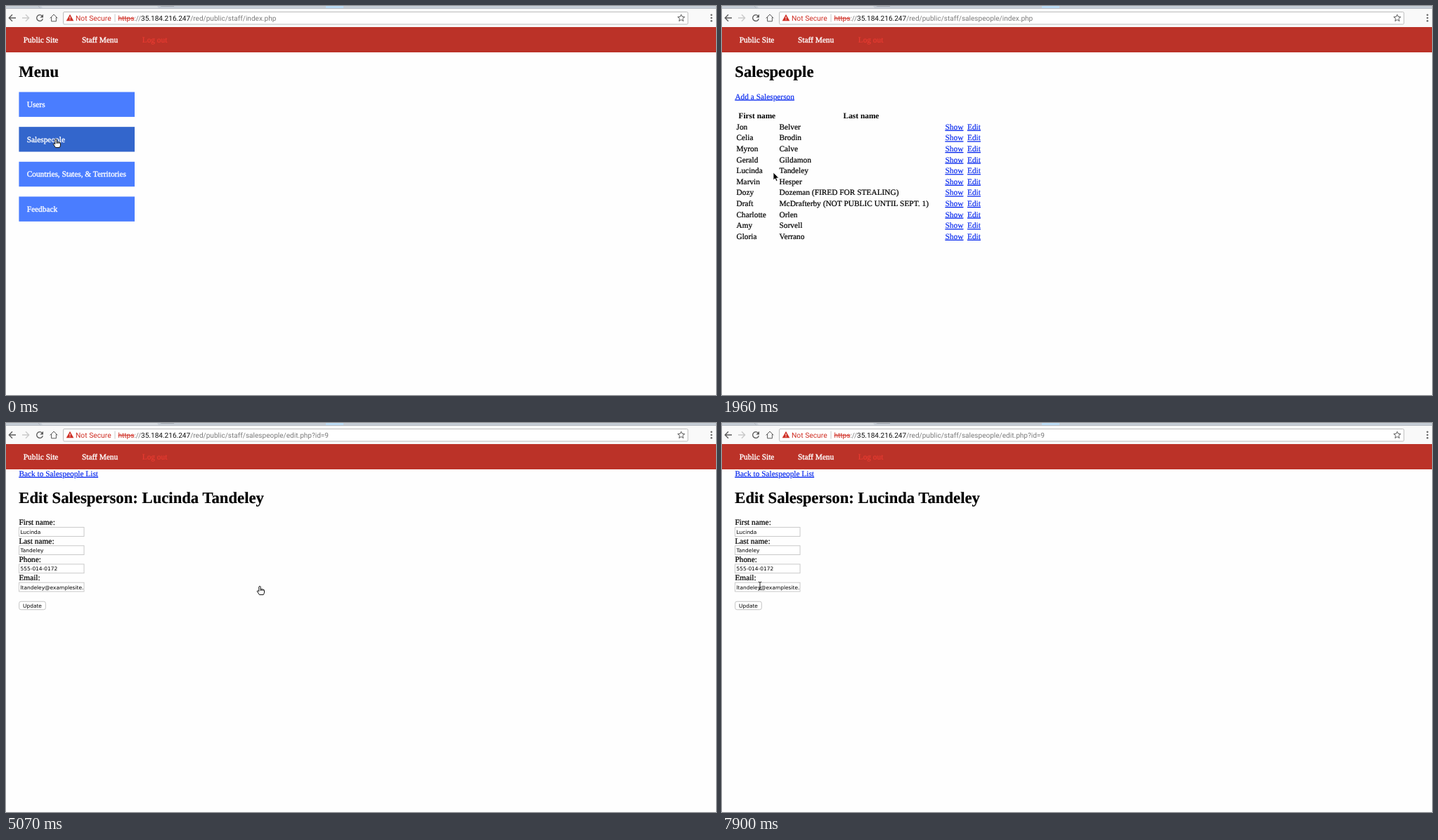
These frames come from a looping animation (1010x554 px, 8 s). An HTML page:

```html
<!DOCTYPE html>
<html lang="en">
<head>
<meta charset="utf-8">
<title>Staff area</title>
<style>
  html, body { margin: 0; height: 100%; overflow: hidden; background: #fefefe; }
  svg { display: block; width: 100vw; height: 100vh; }
  text {
    font: 11.36px "Liberation Serif", serif; text-rendering: geometricPrecision;
    color: #000; fill: currentColor; stroke: currentColor; stroke-width: .22;
  }
  .h1 { font-size: 22.7px; font-weight: bold; }
  .th { font-weight: bold; text-anchor: middle; stroke: none; }
  .light { color: #fff; stroke-width: .35; }
  .logout { color: #e83c32; }
  .link { color: #0426ee; text-decoration: underline; stroke-width: .15; }
  .bar { font: 10.05px Roboto, sans-serif; color: #7b7b7b; stroke: none; }
  .warn { color: #cf2f25; }
  .bar tspan { fill: currentColor; }
  .host { color: #111; }
  .field { font: 7.45px "DejaVu Sans", sans-serif; stroke: none; }
  .icon { fill: none; stroke: #5a5a5a; stroke-width: 1.3; }
  .thin { stroke-width: 1; }
</style>
</head>
<body>
<svg viewBox="0 0 1010 554">
  <defs>
    <path id="arrow" d="M0 0V11L2.5 8.7 4.2 12.5 6 11.7 4.4 8H7.8Z" stroke="#fff" stroke-width=".8"/>
    <path id="hand" d="M-1.2 1.2Q0-.6 1.2 1.2V5Q2 4 3 5Q4.2 4.2 5 5.4Q6.3 5 6.5 6.6V9Q6.3 11 5.2 12.6H-.6Q-2 10-3.9 7.6Q-3.4 5.8-1.2 7.8Z M1.2 5V7M3 5.2V7M5 5.6V7.2" fill="#fff" stroke="#111" stroke-width="1"/>
    <path id="beam" d="M-2.2-5.7Q0-5.7 0-4.4Q0-5.7 2.2-5.7M0-4.5V4.5M-2.2 5.7Q0 5.7 0 4.4Q0 5.7 2.2 5.7M-1.2 2H1.2" fill="none" stroke="#222"/>
  </defs>

  <!-- browser toolbar -->
  <rect width="1010" height="30" fill="#f9f9f9"/>
  <path d="M0 0H1010V3.5H0Z" fill="#c6cdd6"/>
  <path d="M50 0H215L217 3H52Z" fill="#d7dce2"/>
  <path d="M455 0H480V3.5H455Z" fill="#bddcf5"/>
  <path d="M219 0H239V1H221Z" fill="#a3a9b0"/>
  <path d="M0 3.5H1010M46 0L49 3.5" fill="none" stroke="#acb2b9" stroke-width=".8"/>
  <path class="icon" d="M14 17H4.5M9 12.3L4.3 17 9 21.7"/>
  <path class="icon" d="M23 17H32.5M28 12.3L32.7 17 28 21.7" style="stroke:#c9c9c9"/>
  <g id="reload">
    <path class="icon" d="M51.3 14A4.4 4.4 0 1 0 52.3 18.3"/>
    <path d="M53 11.8V16.4H48.4Z" fill="#5a5a5a"/>
  </g>
  <path id="stop" class="icon" d="M44 13L52 21M52 13L44 21"/>
  <path class="icon thin" d="M62.7 17.4L68 12 73.3 17.4M64.6 16V21.8H71.4V16"/>
  <rect x="81.5" y="8.5" width="888.5" height="17.5" rx="1.5" fill="#fff" stroke="#bcbcbc"/>
  <path d="M91 11.8L96.3 21.3H85.7Z" fill="#cf2f25"/>
  <path d="M91 15V18M91 18.8V20" stroke="#fff"/>
  <text class="bar warn" x="99" y="20.5" style="font-size:10.3px">Not Secure</text>
  <path d="M155 11.5V22.5" stroke="#c8c8c8"/>
  <text class="bar" x="159.5" y="20.5"><tspan class="warn" text-decoration="line-through">https</tspan>://<tspan class="host">35.184.216.247</tspan><tspan id="path"></tspan></text>
  <path class="icon thin" d="M960.5 12L961.9 15.3 965.4 15.6 962.7 18 963.5 21.5 960.5 19.6 957.5 21.5 958.3 18 955.6 15.6 959.1 15.3Z"/>
  <g fill="#5a5a5a"><circle cx="1003.5" cy="12.8" r="1.2"/><circle cx="1003.5" cy="17" r="1.2"/><circle cx="1003.5" cy="21.2" r="1.2"/></g>

  <!-- site navigation -->
  <rect y="30" width="1010" height="36" fill="#bb3228"/>
  <text class="light" x="24.8" y="52.4">Public Site</text>
  <text class="light" x="108" y="52.4">Staff Menu</text>
  <text class="logout" x="193.7" y="52.4">Log out</text>

  <g id="menu"></g>
  <g id="list"></g>
  <g id="edit"></g>
  <use id="cursor"/>
</svg>
<script>
const LOOP = 8000;
const el = id => document.getElementById(id);
const text = (x, y, content, style = '') =>
  `<text x="${x}" y="${y}" class="${style}">${content}</text>`;

const menuItems = ['Users', 'Salespeople', 'Countries, States, &amp; Territories', 'Feedback'];
el('menu').innerHTML = text(18.3, 101.4, 'Menu', 'h1') + menuItems.map((label, i) => {
  const y = 122.5 + i * 49.65;
  return `<rect x="18.4" y="${y}" width="164.6" height="35.4" fill="#4a7dff"/>`
    + text(29.7, y + 21.4, label, 'light');
}).join('');
const hovered = el('menu').querySelectorAll('rect')[1];

const people = [
  ['Jon', 'Belver'], ['Celia', 'Brodin'], ['Myron', 'Calve'], ['Gerald', 'Gildamon'],
  ['Lucinda', 'Tandeley'], ['Marvin', 'Hesper'], ['Dozy', 'Dozeman (FIRED FOR STEALING)'],
  ['Draft', 'McDrafterby (NOT PUBLIC UNTIL SEPT. 1)'], ['Charlotte', 'Orlen'],
  ['Amy', 'Sorvell'], ['Gloria', 'Verrano']
];
el('list').innerHTML = text(18.3, 101.4, 'Salespeople', 'h1')
  + text(18.4, 132.5, 'Add a Salesperson', 'link')
  + text(49.8, 160, 'First name', 'th') + text(198, 160, 'Last name', 'th')
  + people.map(([first, last], i) => {
    const y = 175.8 + i * 15.6;
    return text(20.5, y, first) + text(81.5, y, last)
      + text(317.5, y, 'Show', 'link') + text(349, y, 'Edit', 'link');
  }).join('');

const fields = [
  ['First name:', 'Lucinda'], ['Last name:', 'Tandeley'],
  ['Phone:', '555-014-0172'], ['Email:', 'ltandeley@examplesite.']
];
el('edit').innerHTML = text(18.4, 75.8, 'Back to Salespeople List', 'link')
  + text(18.3, 114.3, 'Edit Salesperson: Lucinda Tandeley', 'h1')
  + fields.map(([label, value], i) => {
    const y = 145.3 + i * 26.2;
    return text(18.4, y, label)
      + `<rect x="18.6" y="${y + 3.3}" width="92.4" height="12.8" fill="#fff" stroke="#c4c4c4" stroke-width=".9"/>`
      + text(20.5, y + 12.7, value, 'field');
  }).join('')
  + '<rect x="18.7" y="254.2" width="37.6" height="11.6" rx="2.5" fill="#fff" stroke="#bdbdbd" stroke-width=".9"/>'
  + text(24, 262.8, 'Update', 'field');

const screens = [
  { id: 'menu', start: 0, path: '/red/public/staff/index.php' },
  { id: 'list', start: 470, path: '/red/public/staff/salespeople/index.php' },
  { id: 'edit', start: 5070, path: '/red/public/staff/salespeople/edit.php?id=9' }
];

// Each move: first step time, last step time, evenly timed pointer poses.
const moves = [
  [0, 0, [[71, 189, 'hand']]],
  [1370, 1960, [[71, 194, 'arrow'], [71, 206, 'arrow'], [72, 221, 'arrow'], [73, 232, 'arrow'], [73, 237, 'arrow']]],
  [2560, 3580, [[76, 238, 'arrow'], [90, 235, 'beam'], [118, 236, 'beam'], [165, 240, 'arrow'],
    [218, 242, 'arrow'], [264, 241, 'arrow'], [301, 238, 'arrow'], [323, 236, 'hand']]],
  [3730, 4020, [[341, 234, 'hand'], [356, 232, 'hand'], [361, 232, 'hand']]],
  [5970, 7000, [[345, 225, 'arrow'], [304, 205, 'arrow'], [251, 187, 'arrow'], [200, 179, 'arrow'],
    [155, 195, 'arrow'], [125, 213, 'arrow'], [0, 254, 'arrow'], [6, 243, 'arrow']]],
  [7150, 7450, [[40, 231, 'beam'], [73, 237, 'beam'], [82, 241, 'arrow']]],
  [7750, 7900, [[65, 235, 'beam'], [54, 232, 'beam']]]
];

function pointerAt(t) {
  const [start, end, poses] = moves.findLast(move => move[0] <= t);
  const step = (end - start) / (poses.length - 1) || LOOP;
  return poses[Math.min(poses.length - 1, Math.floor((t - start) / step + 1e-6))];
}

function draw(now) {
  const t = now % LOOP;
  const screen = screens.findLast(s => s.start <= t);
  for (const { id } of screens) el(id).style.display = id === screen.id ? '' : 'none';
  el('path').textContent = screen.path;

  const loading = t >= 150 && t < 470;
  el('reload').style.display = loading ? 'none' : '';
  el('stop').style.display = loading ? '' : 'none';
  hovered.setAttribute('fill', loading ? '#2f61c6' : '#3366cc');

  const [x, y, shape] = pointerAt(t);
  el('cursor').setAttribute('href', '#' + shape);
  el('cursor').setAttribute('transform', `translate(${x} ${y})`);
  requestAnimationFrame(draw);
}
draw(performance.now());
</script>
</body>
</html>
```
